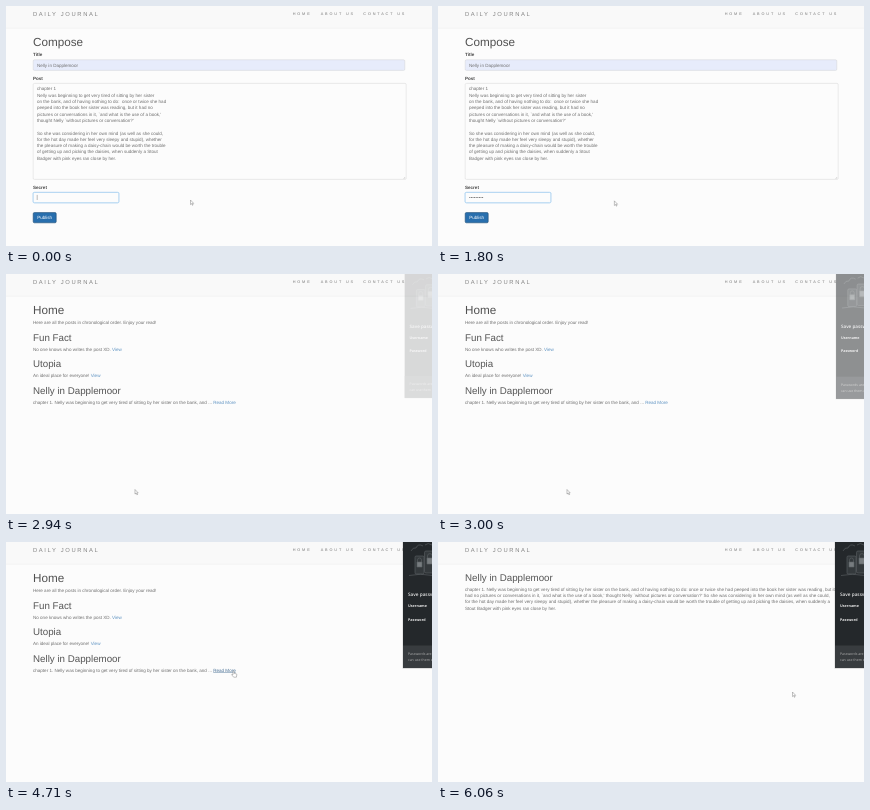
An HTML page for the animation above (6090 ms loop, 426 by 240 pixels).

```html
<!DOCTYPE html>
<html lang="en">
<head>
<meta charset="utf-8">
<title>Daily Journal</title>
<style>
  html, body { margin: 0; width: 100%; height: 100%; overflow: hidden; background: #fcfcfc; }
  svg { display: block; width: 100vw; height: 100vh; }
  text { font: 4.55px "Liberation Sans", Arial, sans-serif; fill: #707070; white-space: pre; text-rendering: geometricPrecision; }
  .h1 { font-size: 11.7px; fill: #505050; }
  .h2 { font-size: 9.75px; fill: #555; }
  .label { font-weight: bold; fill: #444; }
  .brand { font-size: 5.85px; letter-spacing: 1.625px; fill: #858585; }
  .nav { font-size: 3.8px; letter-spacing: 1.86px; fill: #777; }
  .link { fill: #5e93c2; }
  .link.hover { fill: #4a7196; text-decoration: underline; text-decoration-thickness: .3px; }
  .field { fill: #fcfcfc; stroke: #ccc; stroke-width: .4; }
  #bubble text { font: 600 4.7px "Open Sans", sans-serif; fill: #e6e6e6; }
  #bubble .strong { font-size: 3.7px; font-weight: 700; }
  #bubble .note { font-size: 3.5px; font-weight: 400; fill: #b0b0b0; }
</style>
</head>
<body>
<svg viewBox="0 0 426 240" preserveAspectRatio="none">
  <rect width="426" height="240" fill="#fcfcfc"/>
  <rect width="426" height="22" fill="#f9f9f9"/>
  <path d="M0 22.2H426" stroke="#e9e9e9" stroke-width=".5"/>
  <text class="brand" x="27" y="10">DAILY JOURNAL</text>
  <text class="nav" x="286.7" y="9.3">HOME</text>
  <text class="nav" x="314.7" y="9.3">ABOUT US</text>
  <text class="nav" x="357.3" y="9.3">CONTACT US</text>

  <g id="compose">
    <text class="h1" x="27" y="40">Compose</text>
    <text class="label" x="27" y="50.4">Title</text>
    <rect class="field" x="27.2" y="53.8" width="371.6" height="10.6" rx="1.2" style="fill:#e7ecfb"/>
    <text x="31" y="60.7">Nelly in Dapplemoor</text>
    <text class="label" x="27" y="74">Post</text>
    <rect class="field" x="27.2" y="77.4" width="373" height="96" rx="1.2"/>
    <path d="M397.6 172.6l1.6-1.6M398.6 172.6l.6-.6" stroke="#888" stroke-width=".3"/>
    <g id="draft"></g>
    <text class="label" x="27" y="183.2">Secret</text>
    <rect id="glow" x="26.5" y="185.8" width="87" height="11.6" rx="1.8" fill="#d5e8f7"/>
    <rect id="secret" class="field" x="27.2" y="186.4" width="85.6" height="10.3" rx="1.2"/>
    <g id="dots" fill="#666"></g>
    <path id="caret" d="M0 188.9V194" stroke="#555" stroke-width=".4"/>
    <rect id="button" x="27.2" y="206.6" width="23" height="10.2" rx="1.2" stroke="#204d74" stroke-width=".6"/>
    <text x="31.2" y="213.3" style="fill:#fff">Publish</text>
  </g>

  <g id="home">
    <text class="h1" x="27" y="40">Home</text>
    <text x="27" y="50.4">Here are all the posts in chronological order. Enjoy your read!</text>
    <text class="h2" x="27" y="66.6">Fun Fact</text>
    <text x="27" y="76.8">No one knows who writes the post XD. <tspan class="link">View</tspan></text>
    <text class="h2" x="27" y="93">Utopia</text>
    <text x="27" y="103.1">An ideal place for everyone! <tspan class="link">View</tspan></text>
    <text class="h2" x="27" y="119.6">Nelly in Dapplemoor</text>
    <text x="27" y="129.5">chapter 1. Nelly was beginning to get very tired of sitting by her sister on the bank, and ... <tspan id="more" class="link">Read More</tspan></text>
  </g>

  <g id="post">
    <text class="h2" x="27" y="39">Nelly in Dapplemoor</text>
    <g id="story"></g>
  </g>

  <g id="bubble">
    <rect x="396.6" y="-6" width="60" height="132.6" fill="#000" opacity=".2"/>
    <rect x="397" y="-6" width="60" height="132" fill="#24282b"/>
    <rect x="397" y="103.5" width="60" height="22.5" fill="#383c3f"/>
    <g fill="none" stroke="#5d6265" stroke-width=".6">
      <path d="M403 33.5Q414 31 427 33.5M405 9Q407 5 410 6Q412 1 417 4M419 3q3-3 7 0"/>
      <rect x="409" y="14" width="9" height="18" rx="1.2" fill="#34393c"/>
      <rect x="418.5" y="9" width="12" height="22" rx="1.5" fill="#34393c"/>
      <path d="M411.5 20v-2a2 2 0 0 1 4 0v2M421.5 16v-2a2.4 2.4 0 0 1 4.8 0v2"/>
      <path d="M411 20h5v5h-5ZM421 16h6v6h-6Z" fill="#777c7f"/>
    </g>
    <text x="402" y="54">Save password?</text>
    <text class="strong" x="402" y="65">Username</text>
    <text class="strong" x="402" y="78.8">Password</text>
    <text class="note" x="402" y="112.6">Passwords are saved so you</text>
    <text class="note" x="402" y="119.2">can use them on any device</text>
  </g>

  <g id="cursor" stroke="#777" stroke-width=".45" fill="#fff" stroke-linejoin="round">
    <path id="arrow" d="M0 0V4.6L1.1 3.6 1.9 5.3 2.6 5 1.8 3.4H3.2Z"/>
    <path id="hand" d="M0 .6Q.5-.3 1 .6V2.5L3.2 3Q3.9 3.2 3.8 4L3.4 6.4H.7L-1.4 3.9Q-1.3 3 0 3.8Z"/>
  </g>
</svg>
<script>
  const LOOP = 6090;
  const $ = id => document.getElementById(id);
  const show = (id, on) => $(id).setAttribute("visibility", on ? "visible" : "hidden");
  const clamp = v => Math.min(1, Math.max(0, v));
  const smooth = v => v * v * (3 - 2 * v);

  function addLines(id, x, y, step, text) {
    $(id).innerHTML = text.split("\n")
      .map((line, i) => `<text x="${x}" y="${y + i * step}">${line}</text>`).join("");
  }

  addLines("draft", 31, 84.4, 6.3, `chapter 1
Nelly was beginning to get very tired of sitting by her sister
on the bank, and of having nothing to do:  once or twice she had
peeped into the book her sister was reading, but it had no
pictures or conversations in it, \`and what is the use of a book,'
thought Nelly \`without pictures or conversation?'

So she was considering in her own mind (as well as she could,
for the hot day made her feel very sleepy and stupid), whether
the pleasure of making a daisy-chain would be worth the trouble
of getting up and picking the daisies, when suddenly a Stout
Badger with pink eyes ran close by her.`);

  addLines("story", 27, 48.6, 6.33, `chapter 1. Nelly was beginning to get very tired of sitting by her sister on the bank, and of having nothing to do: once or twice she had peeped into the book her sister was reading, but it
had no pictures or conversations in it, \`and what is the use of a book,' thought Nelly \`without pictures or conversation?' So she was considering in her own mind (as well as she could,
for the hot day made her feel very sleepy and stupid), whether the pleasure of making a daisy-chain would be worth the trouble of getting up and picking the daisies, when suddenly a
Stout Badger with pink eyes ran close by her.`);

  const keyTimes = [150, 270, 390, 600, 630, 780, 900, 1080, 1320];
  const DOT = 1.6;
  $("dots").innerHTML = keyTimes
    .map((_, i) => `<circle cx="${31.8 + i * DOT}" cy="191.5" r=".6"/>`).join("");
  const dots = [...$("dots").children];

  const start = [184.5, 194];
  const moves = [
    { from: 1710, to: 2340, end: [41, 209] },
    { from: 2400, to: 2640, end: [129, 215.5] },
    { from: 4080, to: 4710, end: [227, 128.8] },
    { from: 5640, to: 6060, end: [354.5, 150] },
  ];

  function cursorAt(t) {
    let [x, y] = start;
    for (const { from, to, end } of moves) {
      const p = smooth(clamp((t - from) / (to - from)));
      x += (end[0] - x) * p;
      y += (end[1] - y) * p;
    }
    return [x, y];
  }

  function draw(t) {
    const [x, y] = cursorAt(t);
    const page = t < 2940 ? "compose" : t < 4980 ? "home" : "post";
    for (const id of ["compose", "home", "post"]) $(id).style.display = id === page ? "" : "none";

    const typed = keyTimes.filter(k => t >= k).length;
    dots.forEach((dot, i) => dot.setAttribute("visibility", i < typed ? "inherit" : "hidden"));
    const focused = t < 2310;
    show("caret", focused && (t < 1560 || t >= 2060));
    $("caret").setAttribute("transform", `translate(${31.2 + typed * DOT})`);
    show("glow", focused);
    $("secret").style.stroke = focused ? "#66afe9" : "#ccc";

    const onButton = page === "compose" && x < 50 && y > 206;
    const onLink = page === "home" && x > 207 && y < 131;
    $("button").setAttribute("fill", onButton ? "#204d74" : "#286fae");
    $("more").classList.toggle("hover", onLink);

    const pop = smooth(clamp((t - 2880) / 240));
    const scale = .96 + .04 * pop;
    $("bubble").style.display = t >= 2940 ? "" : "none";
    $("bubble").setAttribute("opacity", pop);
    $("bubble").setAttribute("transform", `translate(450 61) scale(${scale}) translate(-450 -61)`);

    const hand = onButton || onLink || (t >= 4980 && t < 5670);
    show("hand", hand);
    show("arrow", !hand);
    $("cursor").setAttribute("transform", `translate(${x} ${y})`);
  }

  function tick() {
    draw(performance.now() % LOOP);
    requestAnimationFrame(tick);
  }
  tick();
</script>
</body>
</html>
```
